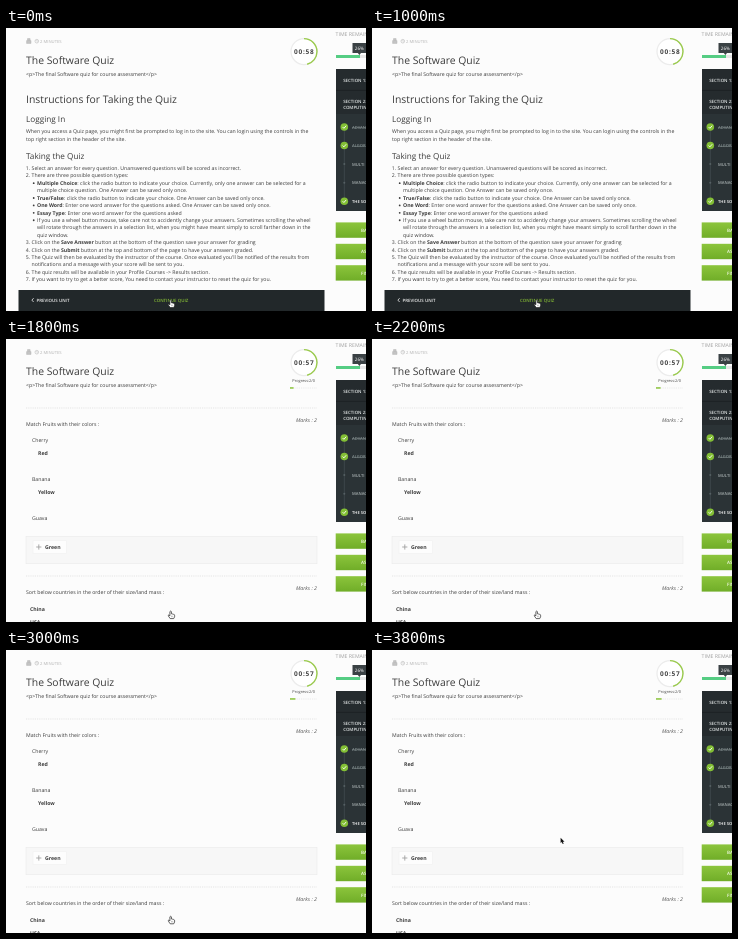
An HTML page that plays this animation: 360x283 px, repeating every 4 s.

```html
<!DOCTYPE html>
<html lang="en">
<head>
<meta charset="utf-8">
<title>Quiz walkthrough</title>
<style>
  html, body { margin: 0; width: 100%; height: 100%; overflow: hidden; background: #fcfcfc; }
  svg { display: block; width: 100%; height: 100%; }
  text { font-family: "Open Sans", sans-serif; font-size: 5.2px; fill: #3c3c3c; text-rendering: geometricPrecision; white-space: pre; }
  .title { font-size: 10.4px; }
  .heading { font-size: 8.2px; }
  .bold { font-weight: 700; }
  .marks { font-style: italic; fill: #555; }
  .meta { font-size: 4.2px; fill: #b4b4b4; }
  .progress { font-size: 3.9px; fill: #444; }
  .timer { font-size: 6.5px; font-weight: 700; letter-spacing: .75px; fill: #444; }
  .nav { font-size: 4.4px; font-weight: 600; fill: #eee; }
  .accent { fill: #83b735; }
  .section { font-size: 4.4px; font-weight: 600; fill: #e2e6e6; }
  .unit { font-size: 4.1px; font-weight: 600; fill: #a9b1b2; }
  .done { fill: #859091; text-decoration: line-through; }
  .current { fill: #fff; }
  .remaining { fill: #a0a0a0; }
  .tip { font-size: 4.6px; fill: #fff; }
  .button { font-size: 4.5px; font-weight: 600; fill: #f3fae8; }
</style>
</head>
<body>
<svg viewBox="0 0 360 283" preserveAspectRatio="none">
  <defs>
    <linearGradient id="green" x2="0" y2="1">
      <stop stop-color="#8cc53c"/><stop offset="1" stop-color="#70ad28"/>
    </linearGradient>
  </defs>
  <rect width="360" height="283" fill="#fcfcfc"/>
  <g id="header">
    <path d="M20.6 12.6h4.4v2.8h-4.4zM21.5 12.4v-1.8h2.6v1.8" fill="#c4c4c4" stroke="#b4b4b4" stroke-width=".5"/>
    <circle cx="30.8" cy="13.2" r="1.8" fill="none" stroke="#b8b8b8" stroke-width=".6"/>
    <path d="M30.8 12.1v1.2h.9" fill="none" stroke="#b8b8b8" stroke-width=".5"/>
    <circle cx="298" cy="23.6" r="13" fill="#fff" stroke="#ececec" stroke-width="1.3"/>
    <circle cx="298" cy="23.6" r="13" fill="none" stroke="#9acb4c" stroke-width="1.4"
      pathLength="100" stroke-dasharray="46 54" transform="rotate(-90 298 23.6)"/>
  </g>
  <g id="intro">
    <rect x="12.5" y="262" width="306" height="21" fill="#22282a"/>
    <path d="M27.6 270.2l-1.7 1.9 1.7 1.9" fill="none" stroke="#eee" stroke-width=".8"/>
  </g>
  <g id="quiz">
    <g stroke="#d6d6d6" stroke-width=".6" stroke-dasharray="1.2 1">
      <path d="M20 69H311M20 237H311"/><path d="M284 49H311" stroke="#ddd"/>
    </g>
    <rect id="bar" x="284" y="48.2" height="1.5" fill="#8cc53c"/>
    <rect x="20" y="197.3" width="291" height="27.4" fill="#f7f7f7" stroke="#ebebeb" stroke-width=".6"/>
    <rect x="27" y="201.8" width="33.5" height="12.4" fill="#fdfdfd" stroke="#eee" stroke-width=".5"/>
    <path d="M30.2 208h5.2M32.8 205.4v5.2" stroke="#a2a2a2" stroke-width=".9"/>
  </g>
  <g id="sidebar">
    <rect x="330" y="27" width="30" height="3" fill="#e6e6e6"/>
    <rect x="330" y="27" width="24" height="3" fill="#55cd83"/>
    <path d="M346.5 15H360V25H355l-1.6 1.9-1.6-1.9h-5.3z" fill="#3a4144"/>
    <rect x="330" y="41" width="30" height="142" fill="#252b2e"/>
    <rect x="330" y="86" width="30" height="97" fill="#2b3336"/>
    <path d="M330 62.4H360" stroke="#1b2022" stroke-width=".8"/>
    <path d="M338.3 99V173" stroke="#465053" stroke-width=".7"/>
  </g>
  <g id="hand" transform="translate(164.7 272)">
    <path d="M-.8 .6Q0-.5.7.6V2.8Q1.6 2.4 1.9 3.1 2.8 2.7 3.1 3.6 4 3.6 3.9 4.5V5.8L3 7.6H-.5L-2.3 5Q-2.8 4-1.9 3.9L-.8 4.8Z"
      fill="#fff" stroke="#222" stroke-width=".7" stroke-linejoin="round"/>
    <path d="M.8 4.7v1.5M2 4.7v1.5" stroke="#555" stroke-width=".35"/>
  </g>
  <path id="arrow" d="M0 0V5.3L1.2 4.2 2.1 6.3 3.1 5.9 2.2 3.9H3.9Z" fill="#111" stroke="#fff" stroke-width=".4" paint-order="stroke"/>
</svg>
<script>
const byId = id => document.getElementById(id);

function add(parent, tag, attrs) {
  const node = document.createElementNS("http://www.w3.org/2000/svg", tag);
  for (const key in attrs) node.setAttribute(key, attrs[key]);
  return byId(parent).appendChild(node);
}

// Parts between asterisks are set in bold.
function write(parent, x, y, words, style = "") {
  const node = add(parent, "text", { x, y, class: style });
  words.split("*").forEach((part, i) => {
    const span = document.createElementNS(node.namespaceURI, "tspan");
    span.textContent = part;
    if (i % 2) span.setAttribute("class", "bold");
    node.append(span);
  });
  return node;
}

write("header", 34, 14.8, "2 MINUTES", "meta");
write("header", 20, 35.9, "The Software Quiz", "title");
write("header", 20, 47.6, "<p>The final Software quiz for course assessment</p>");
const timer = write("header", 288, 25.8, "00:58", "timer").firstChild;

write("intro", 20, 74.9, "Instructions for Taking the Quiz", "title");
write("intro", 20, 94, "Logging In", "heading");
write("intro", 20, 105.4, "When you access a Quiz page, you might first be prompted to log in to the site. You can login using the controls in the");
write("intro", 20, 112.8, "top right section in the header of the site.");
write("intro", 20, 130.9, "Taking the Quiz", "heading");

// A leading digit numbers a line, "-" is a bullet, ">" continues a bullet, "." continues a number.
const rules = [
  "1Select an answer for every question. Unanswered questions will be scored as incorrect.",
  "2There are three possible question types:",
  "-*Multiple Choice*: click the radio button to indicate your choice. Currently, only one answer can be selected for a",
  ">multiple choice question. One Answer can be saved only once.",
  "-*True/False*: click the radio button to indicate your choice. One Answer can be saved only once.",
  "-*One Word*: Enter one word answer for the questions asked. One Answer can be saved only once.",
  "-*Essay Type*: Enter one word answer for the questions asked",
  "-If you use a wheel button mouse, take care not to accidently change your answers. Sometimes scrolling the wheel",
  ">will rotate through the answers in a selection list, when you might have meant simply to scroll farther down in the",
  ">quiz window.",
  "3Click on the *Save Answer* button at the bottom of the question save your answer for grading",
  "4Click on the *Submit* button at the top and bottom of the page to have your answers graded.",
  "5The Quiz will then be evaluated by the instructor of the course. Once evaluated you'll be notified of the results from",
  ".notifications and a message with your score will be sent to you.",
  "6The quiz results will be available in your Profile Courses -> Results section.",
  "7If you want to try to get a better score, You need to contact your instructor to reset the quiz for you."
];
rules.forEach((rule, i) => {
  const mark = rule[0], y = 142 + i * 7.42;
  if (mark === "-") add("intro", "circle", { cx: 27.7, cy: y - 1.7, r: .9, fill: "#3c3c3c" });
  if (mark > "0" && mark < "9") write("intro", 19.8, y, mark + ".");
  write("intro", "->".includes(mark) ? 31 : 25.6, y, rule.slice(1));
});
write("intro", 30.6, 273.7, "PREVIOUS UNIT", "nav");
write("intro", 148, 273.7, "CONTINUE QUIZ", "nav accent");

write("quiz", 286.3, 43.4, "Progress:2/0", "progress");
write("quiz", 20, 86.8, "Match Fruits with their colors :");
write("quiz", 20, 254.8, "Sort below countries in the order of their size/land mass :");
for (const y of [82.8, 250.8]) write("quiz", 290, y, "Marks : 2", "marks");
["Cherry", "Banana", "Guava"].forEach((fruit, i) => write("quiz", 26, 103 + i * 39, fruit));
[[32, 115.8, "Red"], [32, 154.8, "Yellow"], [39, 209.7, "Green"], [24, 272, "China"], [24, 285.3, "USA"]]
  .forEach(([x, y, answer]) => write("quiz", x, y, answer, "bold"));

write("sidebar", 329.6, 8, "TIME REMAINING", "remaining");
write("sidebar", 348.8, 21.5, "26%", "tip");
write("sidebar", 337.2, 53.7, "SECTION 1:", "section");
write("sidebar", 337.2, 74.6, "SECTION 2:", "section");
write("sidebar", 337.2, 80.6, "COMPUTING", "section");
[["ADVANCED", "done"], ["ALGORITHMS", "done"], ["MULTI", ""], ["MANAGING", ""], ["THE SOFTWARE", "current"]]
  .forEach(([unit, state], i) => {
    const y = 99 + i * 18.55;
    write("sidebar", 346, y + 1.6, unit, "unit " + state);
    add("sidebar", "circle", { cx: 338.3, cy: y, r: state ? 3.8 : 1, fill: state ? "#83bf35" : "#566063" });
    if (state) add("sidebar", "path", { d: `M336.6 ${y}l1.3 1.3 2.3-2.6`, fill: "none", stroke: "#fff", "stroke-width": .9 });
  });
["BACK", "ASK", "FINISH"].forEach((label, i) => {
  const y = 194.4 + i * 21.4;
  add("sidebar", "rect", { x: 329.7, y, width: 30.3, height: 15.4, fill: "url(#green)" });
  write("sidebar", 355, y + 9.3, label, "button");
});

const LOOP = 4000, QUIZ_AT = 1400;
const ticks = [0, QUIZ_AT, 1600, 1800, 2000, 2200, 2600, 2800, 3000, 3200, 3600, 3800];
const pointer = [
  [0, "hand", 164.7, 272],
  [3000, "hand", 164.7, 266.2],
  [3200, "arrow", 168.8, 262],
  [3600, "arrow", 173.6, 248.6],
  [3800, "arrow", 188.6, 187.8]
];
const show = (id, on) => byId(id).style.display = on ? "" : "none";

function draw(now) {
  const time = now % LOOP;
  const tick = ticks.findLast(t => t <= time);
  const inQuiz = tick >= QUIZ_AT;
  show("intro", !inQuiz);
  show("quiz", inQuiz);
  timer.textContent = inQuiz ? "00:57" : "00:58";
  byId("bar").setAttribute("width", inQuiz ? 5.7 * (1 - Math.exp((1200 - tick) / 600)) : 0);

  const [, kind, x, y] = pointer.findLast(step => step[0] <= time);
  show("hand", kind === "hand");
  show("arrow", kind === "arrow");
  byId(kind).setAttribute("transform", `translate(${x} ${y})`);
}

const start = performance.now();
(function loop() {
  draw(performance.now() - start);
  requestAnimationFrame(loop);
})();
</script>
</body>
</html>
```
